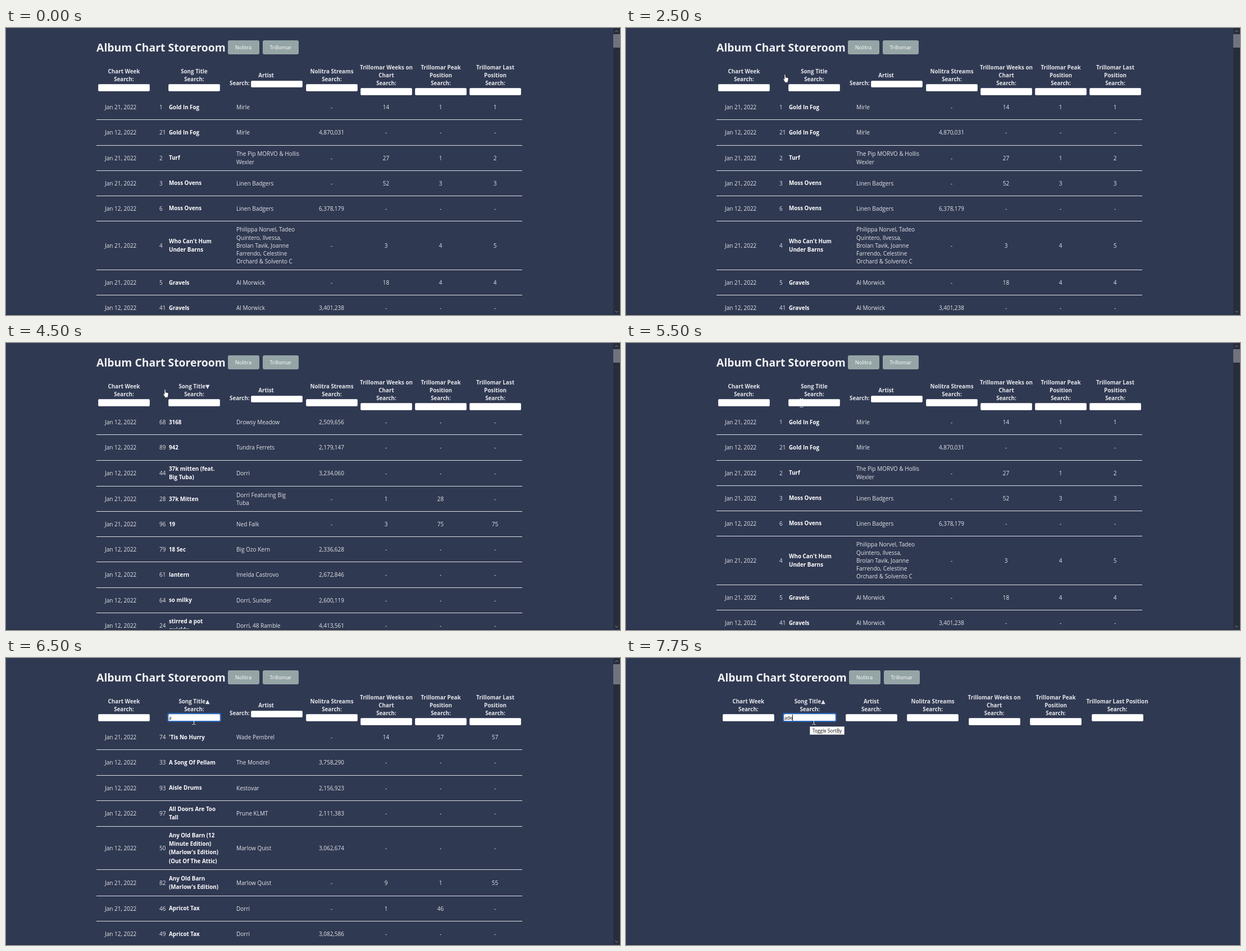
These frames come from a looping animation (1093x512 px, 8 s). An HTML page:

```html
<!DOCTYPE html>
<html lang="en">
<head>
<meta charset="utf-8">
<title>Album Chart Storeroom</title>
<style>
html, body { margin: 0; width: 100%; height: 100%; overflow: hidden; background: #303952; }
body { position: relative; font: 10px/14.22px "Open Sans", "Noto Sans", "DejaVu Sans", sans-serif; color: #e3e5e9; }
#stage { position: absolute; left: 0; top: 0; width: 1093px; height: 512px; overflow: hidden; }
#stage div, #stage svg, .abs { position: absolute; white-space: nowrap; }

/* every change is a hard cut on one eight second clock */
.anim { animation: 8s step-end infinite; }

#bar { left: 0; top: 0; }
#bar h1 { position: absolute; margin: 0; left: 161px; top: 20.5px; font-size: 19.4px; line-height: 28px; color: #f1f2f4; }
.btn { top: 22px; height: 25px; border-radius: 3px; background: #95a5a6; color: #fff; font-size: 9.3px; line-height: 25px; text-align: center; }

.head { width: 130px; text-align: center; font-weight: bold; font-size: 9.8px; }
.field { display: block; box-sizing: border-box; width: 92px; height: 12.5px; margin: 1px auto 0; border: 1px solid #dcdee3; border-radius: 2px; background: #fff; }

.list { left: 161px; top: 119.4px; width: 758px; }
#stage .row { position: static; display: grid; grid-template-columns: 112px 17px 120px 121px repeat(4, 97px); align-items: center;
  box-sizing: border-box; min-height: 45.1px; padding: 7.6px 0; border-bottom: 1px solid #dfe1e5; }
.row span:first-child { padding-left: 15px; }
.row b { font-size: 9.8px; color: #fff; }
.row span:nth-child(n+5) { text-align: center; }

.ring { box-sizing: border-box; width: 96px; height: 16px; border: 2px solid #2a68bd; border-radius: 3px; }
.typed { font-size: 8.3px; line-height: 12px; color: #111; }
#caret { left: 296px; top: 101px; width: 1px; height: 11px; background: #111; }
#hover { left: 289px; top: 100px; box-sizing: border-box; width: 92px; height: 12.5px; border: 1px solid #aeb2bd; border-radius: 2px; }
#tip { left: 327px; top: 122px; box-sizing: border-box; width: 62px; height: 15px; border: 1px solid #b9bbc0; background: #fff; color: #111; font-size: 8.3px; line-height: 13px; text-align: center; }

#track { left: 1081px; top: 0; width: 12px; height: 512px; background: #282d3c; }
#thumb { left: 0; top: 11px; width: 12px; height: 24px; background: #70737e; }
#foot { left: 0; top: 510px; width: 1093px; height: 2px; background: #2a3249; }

#bar { animation-name: bar; }
#full { animation-name: full; }
#empty { animation-name: empty; }
#plain { animation-name: plain; }
#asc { animation-name: asc; }
#desc { animation-name: desc; }
#thumb { animation-name: thumb; }
#hover { animation-name: hover; }
#ring { animation-name: ring; }
#letter { animation-name: letter; }
#caret { animation-name: caret; }
#cursor { animation-name: move; }
#arrow { animation-name: arrow; }
#beam { animation-name: beam; }
#hand { animation-name: hand; }

@keyframes bar { 0% { transform: none } 84.375%, to { transform: translateX(2px) } }
@keyframes full { 0% { visibility: visible } 84.375%, to { visibility: hidden } }
@keyframes empty { 0% { visibility: hidden } 84.375%, to { visibility: visible } }
@keyframes plain { 0%, 68.75% { visibility: visible } 40.625%, 78.125%, to { visibility: hidden } }
@keyframes asc { 0%, 56.25%, 84.375%, to { visibility: hidden } 40.625%, 78.125% { visibility: visible } }
@keyframes desc { 0%, 68.75%, to { visibility: hidden } 56.25% { visibility: visible } }
@keyframes thumb { 0% { height: 24px } 81.25%, to { height: 36px } }
@keyframes hover { 0%, 25%, 75%, to { visibility: hidden } 21.875%, 71.875% { visibility: visible } }
@keyframes ring { 0%, 84.375%, to { visibility: hidden } 75% { visibility: visible } }
@keyframes letter { 0%, 84.375%, to { visibility: hidden } 81.25% { visibility: visible } }
@keyframes caret { 0%, 87.5% { visibility: hidden } 84.375%, 96.875%, to { visibility: visible } }
@keyframes move {
  0%, 6.25% { transform: translate(398px, -4px) }
  9.375% { transform: translate(381px, 30px) }
  12.5% { transform: translate(355px, 44px) }
  15.625% { transform: translate(344px, 54px) }
  18.75% { transform: translate(322px, 97px) }
  21.875% { transform: translate(295px, 99px) }
  25% { transform: translate(278px, 101px) }
  28.125% { transform: translate(282px, 94px) }
  31.25% { transform: translate(279px, 82px) }
  68.75% { transform: translate(309px, 99px) }
  71.875%, to { transform: translate(331px, 103px) }
}
@keyframes arrow { 0%, 9.375%, 18.75%, to { visibility: hidden } 6.25%, 12.5% { visibility: visible } }
@keyframes beam { 0%, 12.5%, 25% { visibility: hidden } 9.375%, 18.75%, 68.75%, to { visibility: visible } }
@keyframes hand { 0%, 68.75%, to { visibility: hidden } 25% { visibility: visible } }
</style>
</head>
<body>
<div id="stage">
  <div id="bar" class="anim">
    <h1 class="abs">Album Chart Storeroom</h1>
    <div class="btn" style="left:394.5px;width:56px">Nolitra</div>
    <div class="btn" style="left:456.8px;width:64px">Trillomar</div>
  </div>
  <div id="full" class="anim">
    <div id="track">
      <div id="thumb" class="anim"></div>
      <svg width="12" height="512" fill="none" stroke="#8c909b"><path d="M3.5 7l2.5-2.5 2.5 2.5M3.5 504.8l2.5 2.5 2.5-2.5"/></svg>
    </div>
  </div>
  <div id="plain" class="anim"></div>
  <div id="asc" class="anim"></div>
  <div id="desc" class="anim"></div>
  <div id="hover" class="anim"></div>
  <div id="ring" class="ring anim" style="left:287px;top:98.4px"></div>
  <div id="letter" class="typed anim" style="left:290px;top:101px">a</div>
  <div id="empty" class="anim"></div>
  <div id="caret" class="anim"></div>
  <div id="foot"></div>
  <div id="cursor" class="anim">
    <svg id="arrow" class="anim" width="10" height="14"><path d="M.5.5v11l2.6-2.4 1.6 3.6 1.7-.7-1.6-3.5h3.7z" fill="#fff" stroke="#222" stroke-width=".6"/></svg>
    <svg id="beam" class="anim" width="8" height="17" fill="none" stroke="#f4f4f4"><path d="M.5.5h2l1 1 1-1h2M3.5 1.5v13M.5 15.5h2l1-1 1 1h2"/></svg>
    <svg id="hand" class="anim" width="11" height="17"><path d="M3 9.5V2q0-1.2 1-1.2T5 2v4l3.6.7q1.7.4 1.5 2l-.7 4-.8 2.5H4.2L3.4 13.5 1 9.8q-.3-1.2.8-1.2z" fill="#fff" stroke="#222" stroke-width=".6"/></svg>
  </div>
</div>
<script>
const $ = id => document.getElementById(id);
const add = (id, html) => $(id).insertAdjacentHTML('beforeend', html);
const br = s => s.replace(/\|/g, '<br>');
const field = '<span class="field"></span>';

// header cell centred on cx; label lines are split by |
function head(cx, label, box = field) {
  const n = label.split('|').length + 1;
  const top = 70.7 - (n - 2) * 6.9;
  return `<div class="head" style="left:${cx - 65}px;top:${top}px">${br(label)}<br>Search:${box}</div>`;
}

const weeks = 'Trillomar Weeks on|Chart', peak = 'Trillomar Peak|Position';
const streams = 'Nolitra Streams';

add('full', [[210, 'Chart Week'], [580, streams], [677, weeks], [774, peak], [871, 'Trillomar Last|Position']]
  .map(c => head(...c)).join('') +
  `<div class="head" style="left:398px;top:78px">Artist</div>
   <div class="head" style="left:398px;top:92.2px;text-align:left">Search:</div>
   <div style="left:436px;top:92.5px">${field}</div>
   <div style="left:289px;top:99.1px">${field}</div>`);

add('empty', ['Chart Week', 'Song Title▲', 'Artist', streams, weeks, peak, 'Trillomar Last Position']
  .map((label, i) => head(217.8 + i * 109.45, label)).join('') +
  `<div class="ring" style="left:279.3px;top:98.4px"></div>
   <div class="typed" style="left:282px;top:101px">ade</div>
   <div id="tip">Toggle SortBy</div>`);

// day / rank / title / artist / streams, or weeks, peak and last
const lists = {
  plain: ['Song Title', `21/1/Gold In Fog/Mirle/14 1 1
12/21/Gold In Fog/Mirle/4,870,031
21/2/Turf/The Pip MORVO & Hollis|Wexler/27 1 2
21/3/Moss Ovens/Linen Badgers/52 3 3
12/6/Moss Ovens/Linen Badgers/6,378,179
21/4/Who Can't Hum|Under Barns/Philippa Norvel, Tadeo|Quintero, Ilvessa,|Brolan Tavik, Joanne|Farrendo, Celestine|Orchard & Solvento C/3 4 5
21/5/Gravels/Al Morwick/18 4 4
12/41/Gravels/Al Morwick/3,401,238`],
  asc: ['Song Title▲', `21/74/'Tis No Hurry/Wade Pembrel/14 57 57
12/33/A Song Of Pellam/The Mondrel/3,758,290
12/93/Aisle Drums/Kestovar/2,156,923
12/97/All Doors Are Too|Tall/Prune KLMT/2,111,383
12/50/Any Old Barn (12|Minute Edition)|(Marlow's Edition)|(Out Of The Attic)/Marlow Quist/3,062,674
21/82/Any Old Barn|(Marlow's Edition)/Marlow Quist/9 1 55
21/46/Apricot Tax/Dorri/1 46 -
12/49/Apricot Tax/Dorri/3,082,586`],
  desc: ['Song Title▼', `12/68/3168/Drowsy Meadow/2,509,656
12/89/942/Tundra Ferrets/2,179,147
12/44/37k mitten (feat.|Big Tuba)/Dorri/3,234,060
21/28/37k Mitten/Dorri Featuring Big|Tuba/1 28 -
21/96/19/Ned Falk/3 75 75
12/79/18 Sec/Big Ozo Kern/2,336,628
12/61/lantern/Imelda Castrovo/2,672,846
12/64/so milky/Dorri, Sunder/2,600,119
12/24/stirred a pot|quickly/Dorri, 48 Ramble/4,413,561`]
};

function row(line) {
  const [day, rank, title, artist, nums] = line.split('/');
  const vals = day === '21' ? ['-', ...nums.split(' ')] : [nums, '-', '-', '-'];
  const cells = [`Jan ${day}, 2022`, rank, `<b>${br(title)}</b>`, br(artist.replace('&', '&amp;')), ...vals];
  return `<div class="row">${cells.map(c => `<span>${c}</span>`).join('')}</div>`;
}

for (const id in lists) {
  const [label, text] = lists[id];
  const rows = text.split('\n').map(row).join('');
  add(id, head(335, label, '') + `<div class="list">${rows}</div>`);
}
</script>
</body>
</html>
```
